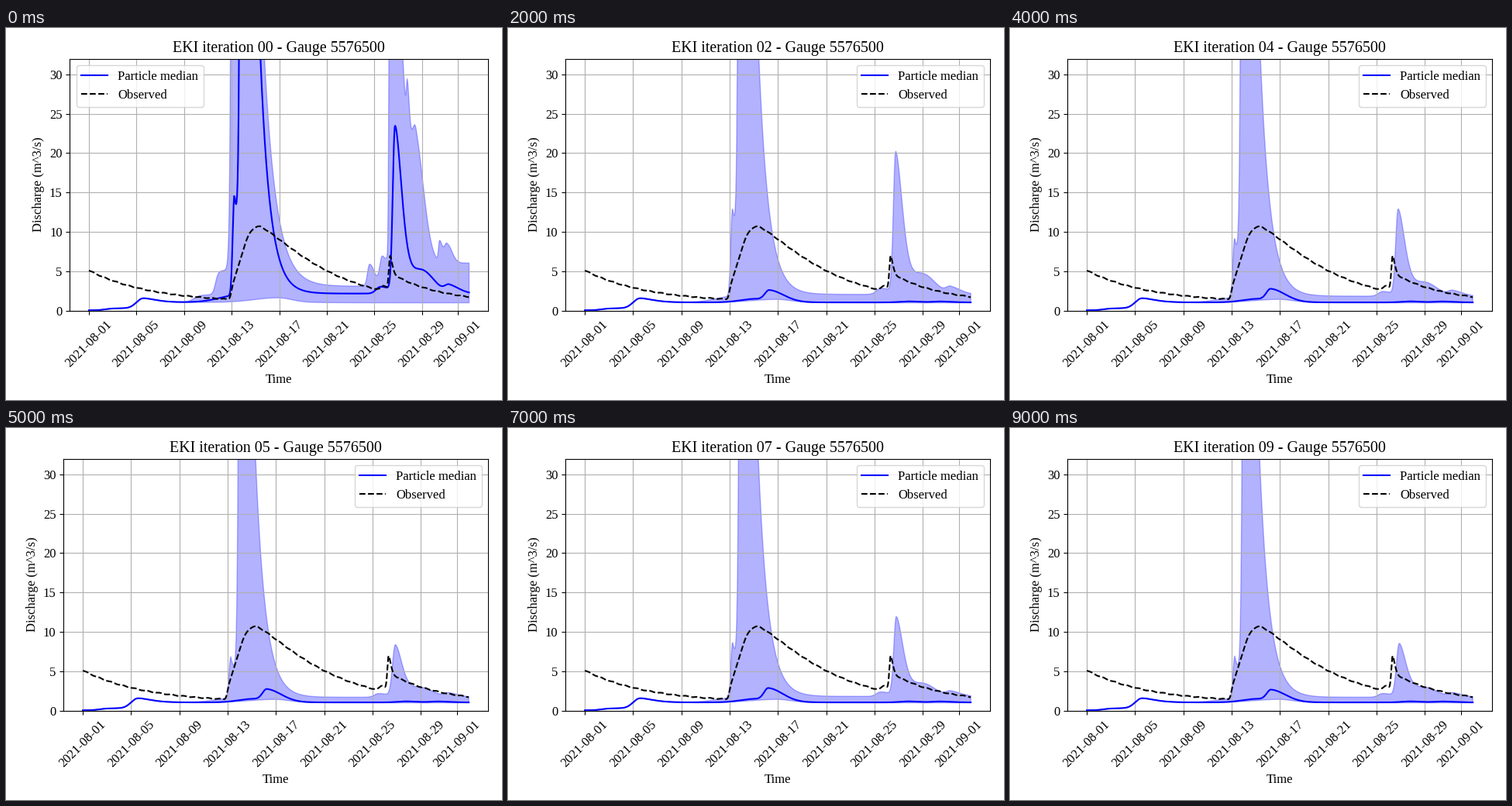
Recreate the animation shown at these times as a matplotlib script. Size 640x480 px, loop 10000 ms.

```python
import numpy as np
import matplotlib.pyplot as plt
from matplotlib.animation import FuncAnimation

plt.rcParams.update({"font.family": "Liberation Serif", "font.size": 12})

W, H = 640, 480
RIGHT, TOP, BOTTOM = 622, 39.58, 364.51
T = np.arange(768) / 24  # hourly, in days
SPAN = T[-1]
TICKS = [*range(0, 29, 4), 31]
LABELS = [f"2021-{8 + d // 31:02d}-{d % 31 + 1:02d}" for d in TICKS]

# Per iteration: left edge of the axes, upper band level, median bump.
STEPS = [(82.4, 1.2, 0), (65.9, 0, 0), (74.2, 1, .6), (65.9, .01, .18),
         (74.2, .55, .85), (74.2, .27, .8), (74.2, .47, .95),
         (74.2, .49, 1), (74.2, .28, .7), (74.2, .28, .68)]


def step(t0, width):
    """Smooth switch from 0 to 1 around t0."""
    return .5 + .5 * np.tanh((T - t0) / (2 * width))


def pulse(peak, height, rise, fall, up=2, down=2):
    """Bell with its own width and steepness on each side."""
    u = T - peak
    before = u < 0
    width = np.where(before, rise, fall)
    power = np.where(before, up, down)
    return height * np.exp(-(np.abs(u) / width) ** power)


def surge(start, cross, tau):
    """Abrupt rise at start, then decay that passes 30 at cross."""
    return 30 * np.exp((cross - T) / tau) * step(start, .075)


def observed():
    recession = 1 + 4.1 * np.exp(-T / 5.2) + .05 * np.sin(2 * np.pi * (T - 1.1))
    first = pulse(14.4, 9.4, 1.99, 6.3, 2.8, 1.25) * step(11.93, .07)
    second = pulse(25.34, 2, .13, .25, 2, 1.5) + pulse(25.3, 2.5, .15, 4, 2, 1)
    return recession + first + second + pulse(24.8, .7, .3, .4)


def base():
    """First days, shared by all model runs."""
    return (.03 + .25 * step(1.4, .3) + .75 * step(3.8, .25)
            + pulse(4.55, .56, .6, 1.5, 2, 1.5))


def lower(height):
    return base() + pulse(15.9, height, 2.8, 1.6) - .05 * step(20, 1)


def calm(bump):
    """Median with only a small flood."""
    return (base() + pulse(14.1, .45, 1.7, 2.5)
            + pulse(15.4 - .2 * bump, .85 + .61 * bump, .5, 1.7)
            + pulse(26.8, .13, 1, 1.2) + pulse(29.4, .12, .9, 1.3))


def flood(level):
    """Two floods; a higher level makes them earlier and larger."""
    e = 1 - np.exp(-4 * level)
    first = (pulse(12.3 - .07 * e, 3.1 + 7.9 * level, .2, .7, 2, 1)
             + surge(13.34 - .55 * e, 14.12 + .29 * e, .83))
    second = (pulse(26.15 - .42 * e, 2.2 + 15.4 * level, .45 - .19 * e, .8,
                    2, 1.75)
              + pulse(27.9, .75 + 1.9 * level, 1.6, 1.5))
    ripples = (pulse(24.5, .35 + .4 * level, .5, 1)
               + pulse(30.3, .35 + .5 * level, .5, 1.2))
    return (base() + (.52 + .5 * level) * step(11, .8)
            + first + second + ripples)


def widest():
    """Upper bound of the first ensemble."""
    level = (.95 * step(8.8, .25) + 3.1 * step(10.65, .12)
             - 2 * step(13, .3) + 2.95 * step(25.1, .1))
    second = (pulse(25.3, 48, .1, 1.4) + pulse(26.78, 6, .12, .25)
              + pulse(27.5, 13, .5, 1))
    ripples = (pulse(23.6, 2.8, .25, .6) + pulse(24.67, 3.7, .3, .6)
               + pulse(29.48, 2.6, .12, .35) + pulse(30.1, 2.4, .3, .6))
    return base() + level + surge(12.11, 14.73, 1.02) + second + ripples


def curves(i):
    _, level, bump = STEPS[i]
    if i == 0:
        return lower(.58), flood(level), widest()
    return lower(.38), calm(bump), flood(level)


fig = plt.figure(figsize=(W / 100, H / 100), dpi=100)
ax = fig.add_subplot()


def draw(i):
    left = STEPS[i][0]
    low, mid, top = curves(i)
    ax.clear()
    ax.set_position([left / W, 1 - BOTTOM / H,
                     (RIGHT - left) / W, (BOTTOM - TOP) / H])
    ax.fill_between(T, low, top, color="blue", alpha=0.3)
    ax.plot(T, mid, color="blue", label="Particle median")
    ax.plot(T, observed(), "k--", label="Observed")
    ax.set_xlim(-.05 * SPAN, 1.05 * SPAN)
    ax.set_ylim(0, 32)
    ax.set_xticks(TICKS, LABELS, rotation=45)
    ax.set_yticks(range(0, 31, 5))
    ax.grid(True)
    ax.set_title(f"EKI iteration {i:02d} - Gauge 5576500")
    ax.set_xlabel("Time", va="baseline")
    ax.xaxis.set_label_coords(.5, (BOTTOM - 458) / (BOTTOM - TOP))
    ax.set_ylabel("Discharge (m^3/s)")
    ax.legend(loc="upper right" if i else "upper left")
    return []


anim = FuncAnimation(fig, draw, frames=len(STEPS), interval=1000,
                     init_func=lambda: draw(0), repeat=True, repeat_delay=0)
plt.show()
```
